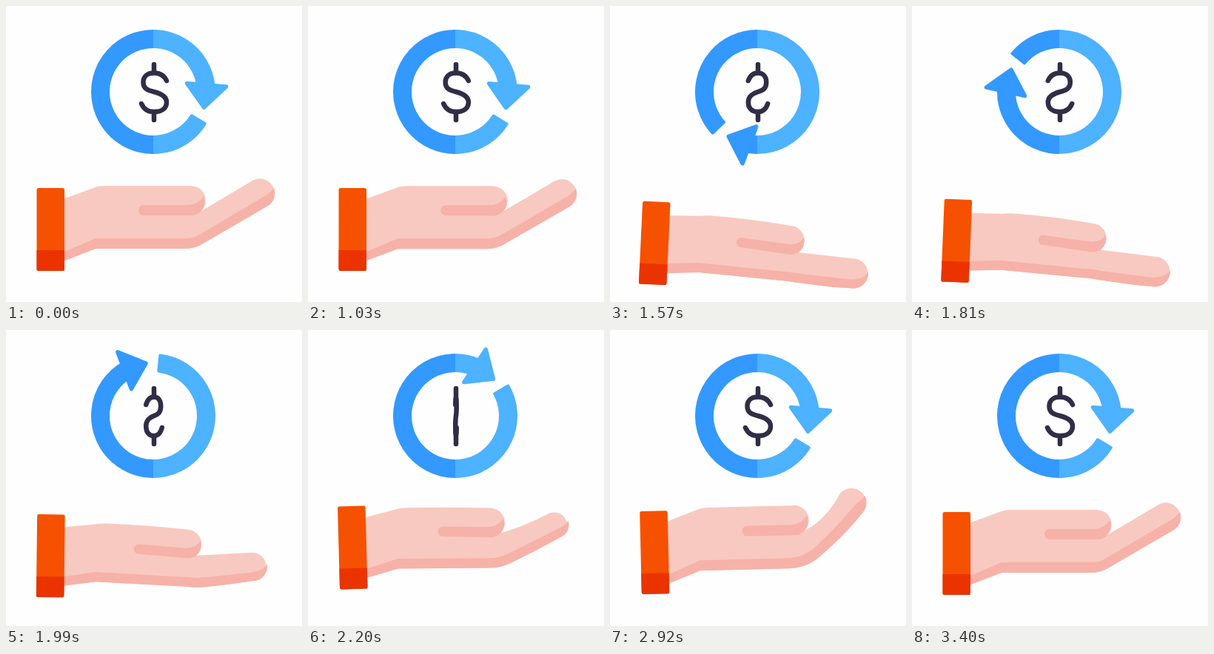
Recreate the animation shown at these times as an HTML page. Size 400x400 px, loop 3430 ms.

```html
<!DOCTYPE html>
<html lang="en">
<head>
<meta charset="utf-8">
<title>Money back</title>
<style>
  html, body { margin: 0; width: 100%; height: 100%; overflow: hidden; background: #fefefe; }
  svg { display: block; width: 100%; height: 100%; }
</style>
</head>
<body>
<svg viewBox="0 0 400 400">
  <defs>
    <clipPath id="left"><rect width="199" height="400"/></clipPath>
    <clipPath id="right"><rect x="199" width="201" height="400"/></clipPath>
    <g id="arrow" stroke-linejoin="round">
      <path id="ring" stroke-width="4"/>
      <path d="M244.5 104.5L297.5 109L267.5 137Z" stroke-width="5.5"/>
    </g>
  </defs>

  <g clip-path="url(#left)" fill="#3399ff" stroke="#3399ff"><use class="spin" href="#arrow"/></g>
  <g clip-path="url(#right)" fill="#4db2ff" stroke="#4db2ff"><use class="spin" href="#arrow"/></g>

  <g fill="none" stroke="#302d47" stroke-width="6.5" stroke-linecap="round" stroke-linejoin="round">
    <path d="M200 79V90M200 143.500V154"/>
    <path id="sign"/>
  </g>

  <g id="arm">
    <path id="skin" fill="#f8c9c0"/>
    <path id="shade" fill="#f6b2a8"/>
    <path id="thumb" fill="#f6b2a8"/>
    <rect x="41.500" y="246" width="37.500" height="112" rx="2.500" fill="#f55100"/>
    <path d="M41.500 330H79V355.500Q79 358 76.500 358H44Q41.500 358 41.500 355.500Z" fill="#eb3300"/>
  </g>
</svg>
<script>
const LOOP = 3430;
const $ = id => document.getElementById(id);

// Each point: rest x, y, lowered x, y and, where the finger curls, raised x, y.
const palm = {
  a: [77, 261, 77, 264],
  b: [118, 246, 118, 264],
  c: [125, 243, 126, 263],
  d: [134, 243, 134, 263],
  e: [190, 243, 190, 265],
  f: [248, 243, 243, 272.5],
  g: [264, 277, 254.5, 308],
  s: [242, 328, 244, 346.5],
  t: [121, 328, 122, 339.7],
  u: [77, 345, 77, 341.5]
};
const finger = {
  h: [298, 257, 294, 312.5, 290.5, 266],
  i: [333, 236, 333.8, 317.2, 307, 227],
  o: [354, 270, 325.3, 357.5, 341.5, 248.5],
  p: [311, 295, 296.3, 355.2, 321, 281],
  q: [268, 320, 270.6, 350, 287, 311],
  r: [256, 328, 256, 348.5, 268, 327.5]
};
const underside = {
  va: [77, 333, 77, 328.5],
  vb: [121, 314, 121, 326.8],
  vc: [242, 314, 246, 334.4],
  vd: [254, 314, 258, 336, 262, 313],
  ve: [262, 308.5, 268, 337, 278, 300.5],
  vf: [304, 284, 298, 341.5, 310, 269],
  vg: [346, 259, 327.5, 345.4, 330.4, 239],
  vh: [357, 253, 344, 345, 340, 231],
  vi: [362, 246, 349.5, 335, 342, 228.5]
};
const fold = {
  wa: [186, 269, 174.6, 290.7],
  wb: [186, 283, 174.2, 303.7],
  wc: [248, 283, 242, 311],
  wd: [267.3, 257.5, 261, 287],
  we: [258, 269, 255, 298],
  wf: [246, 269, 242, 297.3]
};
const points = { ...palm, ...finger, ...underside, ...fold };

const lowerEdge = 'A# # 0 0 1 o Q p q Q r s L t L u Z';
const paths = {
  skin: 'M a L b Q c d Q e f A20 20 0 0 1 g Q h i ' + lowerEdge,
  shade: 'M va L vb L vc Q vd ve Q vf vg Q vh vi ' + lowerEdge,
  thumb: 'M wa A7 7 0 0 0 wb L wc A20 20 0 0 0 g A20 20 0 0 0 wd Q we wf Z'
};

const dollar = [
  [217, 101], [214, 94.5], [208, 90.5], [200, 90.5],
  [190.5, 90.5], [185.5, 96], [185.5, 103],
  [185.5, 112], [192, 114], [200, 116],
  [210, 118.5], [217, 122], [217, 130],
  [217, 138], [211, 143], [200, 143],
  [191, 143], [186, 139], [183, 132]
];

const smooth = u => u * u * (3 - 2 * u);

// Eased value between [time, value] keys.
function keyed(keys, t) {
  if (t <= keys[0][0]) return keys[0][1];
  for (let i = 1; i < keys.length; i++) {
    const [t0, v0] = keys[i - 1], [t1, v1] = keys[i];
    if (t < t1) return v0 + (v1 - v0) * smooth((t - t0) / (t1 - t0));
  }
  return keys[keys.length - 1][1];
}

// Ease with handles at x1 and x2 and flat ends.
function bezier(x, x1, x2) {
  let lo = 0, hi = 1;
  for (let i = 0; i < 30; i++) {
    const m = (lo + hi) / 2, n = 1 - m;
    if (3 * x1 * m * n * n + 3 * x2 * m * m * n + m * m * m < x) lo = m;
    else hi = m;
  }
  return smooth(lo);
}

const polar = (r, deg) => {
  const a = deg * Math.PI / 180;
  return (199 + r * Math.cos(a)).toFixed(2) + ' ' + (116 + r * Math.sin(a)).toFixed(2);
};
$('ring').setAttribute('d',
  `M${polar(82, 31.6)}A82 82 0 1 1 ${polar(82, -5)}L${polar(61, -5)}A61 61 0 1 0 ${polar(61, 31.9)}Z`);

function drawHand(t) {
  const low = keyed([[1000, 0], [1690, 1], [2550, 0]], t);
  const curl = keyed([[1950, 0], [2720, 1], [3400, 0]], t);
  const drop = keyed([[1000, 0], [1667, 19.5], [2250, -8.6], [3150, 0]], t);
  const tilt = keyed([[1000, 0], [1667, 2.85], [2450, -3], [3330, 0]], t);

  const at = k => {
    const [x, y, lx, ly, ux = x, uy = y] = points[k];
    return [x + (lx - x) * low + (ux - x) * curl, y + (ly - y) * low + (uy - y) * curl];
  };
  const [x0, y0] = at('i'), [x1, y1] = at('o');
  const cap = (Math.hypot(x1 - x0, y1 - y0) / 2 + 0.01).toFixed(2);

  for (const id in paths) {
    $(id).setAttribute('d', paths[id]
      .replace(/[a-z]+/g, k => at(k).map(n => n.toFixed(2)).join(' '))
      .replace(/#/g, cap));
  }
  $('arm').setAttribute('transform', `translate(0 ${drop}) rotate(${tilt} 60.5 302)`);
}

function draw(t) {
  const turn = 360 * bezier(Math.min(1, Math.max(0, (t - 1000) / 1790)), 0.33, 0.51);
  document.querySelectorAll('.spin').forEach(el =>
    el.setAttribute('transform', `rotate(${turn} 199 116)`));

  const flip = keyed([[1000, 1], [1720, -1], [2710, 1]], t);
  const [first, ...rest] = dollar.map(([x, y]) => (200 + (x - 200) * flip).toFixed(2) + ' ' + y);
  $('sign').setAttribute('d', `M${first}C${rest.join(' ')}`);

  drawHand(t);
}

let start;
function tick(now) {
  start ??= now;
  draw((now - start) % LOOP);
  requestAnimationFrame(tick);
}
draw(0);
requestAnimationFrame(tick);
</script>
</body>
</html>
```
